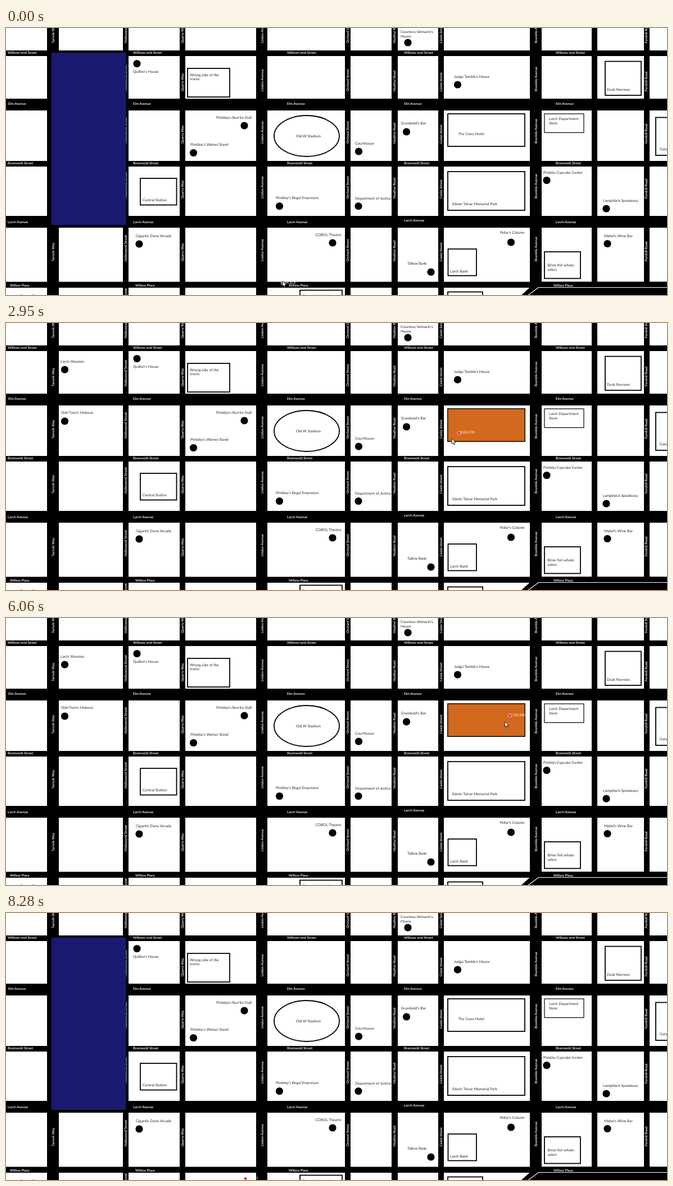
An HTML page for the animation above (8.36 s loop, 1176x476 px).

```html
<!DOCTYPE html>
<html lang="en">
<head>
<meta charset="utf-8">
<title>City map</title>
<style>
  html, body { margin: 0; width: 100%; height: 100%; overflow: hidden; background: #000; }
  svg { display: block; width: 100vw; height: 100vh; background: #fff; }
  text { font-family: Lato, "Open Sans", sans-serif; text-rendering: geometricPrecision; white-space: pre; }
  .street { font-size: 6.1px; font-weight: 600; fill: #fff; }
  .place { font-size: 6.6px; fill: #2a2a2a; }
  .coords { font-family: "Liberation Sans", Arial, sans-serif; font-size: 6.4px; fill: #fff; }
  .outline { fill: none; stroke: #000; stroke-width: 1.8; }
</style>
</head>
<body>
<svg id="stage" viewBox="0 0 1176 476"></svg>
<script>
const stage = document.getElementById('stage');

function add(tag, attrs, text) {
  const el = document.createElementNS('http://www.w3.org/2000/svg', tag);
  for (const key in attrs) el.setAttribute(key, attrs[key]);
  if (text) el.textContent = text;
  return stage.appendChild(el);
}

const rect = (x, y, width, height, more) => add('rect', { x, y, width, height, ...more });

// Roads running down, named once per block
function avenue(left, right, name, x) {
  rect(left, 0, right - left, 476);
  if (name) for (const y of [27, 113, 206, 304, 416]) rise(name, x, y);
}

function rise(name, x, y) {
  add('text', { transform: `translate(${x + 2} ${y}) rotate(-90)`, class: 'street' }, name);
}

// Roads running across
function street(top, bottom) {
  rect(0, top, 1176, bottom - top);
}

function label(name, y, ...starts) {
  for (const x of starts) add('text', { x, y, class: 'street' }, name);
}

street(40, 50);
street(126, 147);
street(237, 247);
street(335, 356);
street(452.5, 463);
avenue(73, 94, 'Tarnvik Way', 84);
avenue(208, 218, 'Hollowend Street', 213);
avenue(309, 319, 'Quarry Way', 314);
avenue(445, 465, 'Linden Avenue', 456);
avenue(603, 613, 'Orchard Street', 608);
avenue(686, 697, 'Heather Road', 691);
avenue(769, 779, 'Cedar Street', 774);
avenue(932, 953, 'Bramble Avenue', 943);
avenue(1042, 1052);
avenue(1135, 1145, 'Fernhill Road', 1139);
rise('Hollowend Street', 213, 511);

add('path', { d: 'M917 476L943 452.5H1176V476Z' });
add('path', { d: 'M928 477L947.5 462.5H1177', class: 'outline', style: 'stroke:#fff;stroke-width:1.2' });

label('Willows-end Street', 46, 3, 226, 500, 708, 978);
label('Elm Avenue', 136.5, 4, 226, 500, 708, 978);
label('Bramwold Street', 243, 3, 226, 500, 708, 978);
label('Larch Avenue', 348, 3, 226, 500, 978);
label('Larch Avenue', 345.3, 708);
label('Willow Place', 461, 7, 230, 503, 974);

// Outlined buildings
const box = (x, y, w, h) => rect(x, y, w, h, { class: 'outline' });
box(323, 72, 75, 51);
box(786, 153, 137, 58);
box(958, 153, 70, 33.5).style.strokeWidth = 1.2;
box(1066, 59.5, 64, 60.5);
box(1156, 159.5, 40, 67.5);
box(239, 268, 64.5, 47.5);
box(786, 256, 137, 69);
box(786.5, 394, 50.5, 47.5);
box(958, 399, 64, 47.5);
box(523, 467.5, 75, 40);
box(786, 470.5, 62, 30);
add('ellipse', { cx: 535, cy: 192.5, rx: 58, ry: 36.5, class: 'outline' });

// A named place, with an optional marker
function place(name, x, y, cx, cy) {
  add('text', { x, y, class: 'place' }, name);
  if (cx) add('circle', { cx, cy, r: 6.6 });
}

place("Countess Velmarin's", 702, 8.5);
place('House', 702, 16.5, 715, 26);
place("Quillon's House", 226, 79.5, 233, 63.5);
place("Judge Tamble's House", 797, 88.7, 803.5, 101);
place("Pimbley's Burrito Stall", 374, 162, 424, 174);
place("Pimbley's Weiner Stand", 328, 209.5, 333.5, 222.5);
place("Grumbold's Bar", 702.5, 172, 712.5, 185);
place('Courthouse', 621, 208, 627.5, 220);
place('Pimblys Cupcake Center', 956, 259.5, 962, 271.5);
place("Pimbley's Begel Emproium", 480, 305.3, 486.5, 317.5);
place('Department of Justice', 621, 305.5, 627, 317.5);
place('Lampblack Speakeasy', 1062, 310, 1068, 322);
place('Gigantic Dune Arcade', 231, 373, 237, 385);
place('COBOL Theatre', 550.5, 371, 581, 383);
place('Tallow Bank', 714, 422, 756, 435);
place("Pellar's Column", 878.5, 366.5, 898.5, 382);
place("Mabel's Wine Bar", 1064, 372.5, 1070, 384.5);
place('Larch Mansion', 97, 71, 104.5, 83);
place("Odd Twin's Hideout", 98, 162, 104.5, 175);
place('Wrong side of the', 327, 85.8);
place('tracks', 327, 93.4);
place('Old W Stadium', 516, 194.8);
place('The Cress Hotel', 804.5, 190.8);
place('Larch Department', 966, 164.3);
place('Store', 966, 172.3);
place('Dusk Narrows', 1069, 112.3);
place('Gang', 1163, 218);
place('Central Station', 243, 309.3);
place('Edwin Tolvar Memorial Park', 794, 316.3);
place('Larch Bank', 790, 436);
place('Brine fish whole-', 963.5, 425.3);
place('salers', 963.5, 433.3);
place('General Hospital', 527, 479.5);
place('Corner Shop', 25, 480);

// Highlights
const district = rect(80.5, 44, 133, 307, { fill: 'midnightblue' });
const hotel = rect(786, 153, 137, 58, { fill: 'chocolate', stroke: '#000' });
const stall = add('circle', { cx: 486.5, cy: 317, r: 53, fill: 'chocolate', stroke: '#000' });

// Pointer
const coords = add('text', { class: 'coords' });
const dot = add('circle', { r: 2.7, fill: '#e0141e', stroke: '#fff', 'stroke-width': 0.8 });
const arrow = add('path', {
  d: 'M0 0V9.6L2.2 7.6 3.8 11.2 5.4 10.5 3.8 7H6.9Z',
  fill: '#fff', stroke: '#000', 'stroke-width': 0.8
});

const LOOP = 8360, STEP = 80, LEAD = 80, SCALE = 1.9235;

// Redraws tick on from each of these times
const starts = [0, 150, 830, 1720, 2000, 2950, 3740, 3920, 4150, 5330,
  6230, 6680, 7130, 8010, 8280, LOOP];

// Pointer path: time, x, y
const path = [
  [0, 492, 455], [80, 492, 441], [400, 495, 350], [640, 500, 335], [870, 508, 332],
  [1200, 631, 290], [1650, 490, 285], [1720, 484, 255], [1800, 481, 227], [2000, 481, 227],
  [2600, 790, 194], [2780, 822, 192], [2950, 806, 196.5], [3030, 793, 196], [3200, 779, 215],
  [3500, 810, 235], [3740, 868, 201], [4000, 868, 203], [4230, 868, 203], [4700, 935, 190],
  [4990, 938, 187], [5150, 895, 182], [5330, 906, 180], [5410, 922, 170], [5750, 929, 172],
  [6200, 880, 175], [6500, 840, 160], [6680, 808, 136.5], [6760, 798, 124], [7010, 725, 140],
  [7880, 505, 320], [8010, 465, 392], [8280, 426, 473.5], [LOOP, 420, 510]
];

function pointAt(t) {
  const i = Math.max(1, path.findIndex(p => p[0] >= t));
  const [t0, x0, y0] = path[i - 1], [t1, x1, y1] = path[i];
  const k = (t - t0) / (t1 - t0);
  return [x0 + (x1 - x0) * k, y0 + (y1 - y0) * k];
}

// Latest redraw at or before t; none falls just ahead of the next start
function redrawTime(t) {
  const i = starts.findIndex(s => s > t);
  const from = starts[i - 1];
  const most = Math.max(0, Math.floor((starts[i] - from - 100) / STEP));
  return from + STEP * Math.min(most, Math.floor((t - from) / STEP));
}

const show = (el, on) => { el.style.display = on ? '' : 'none'; };

function draw(now) {
  const t = redrawTime(now % LOOP);
  const [x, y] = pointAt(t);
  const [ax, ay] = pointAt(Math.min(t + LEAD, LOOP));
  const inHotel = x > 786 && x < 923 && y > 153 && y < 211;
  const inStall = Math.hypot(x - 486.5, y - 317) < 53;
  show(hotel, inHotel);
  show(stall, inStall);
  show(district, !inHotel && !inStall);

  const tracked = t < 1720 || t >= 1800;
  show(dot, tracked);
  show(coords, tracked);
  dot.setAttribute('cx', x);
  dot.setAttribute('cy', y);
  coords.setAttribute('x', x + 0.5);
  coords.setAttribute('y', y + 0.5);
  coords.textContent = `${Math.round(x * SCALE)},${Math.round(y * SCALE)}`;
  arrow.setAttribute('transform', `translate(${ax} ${ay + 10})`);
}

const begin = performance.now();
function tick() {
  draw(performance.now() - begin);
  requestAnimationFrame(tick);
}
tick();
</script>
</body>
</html>
```
